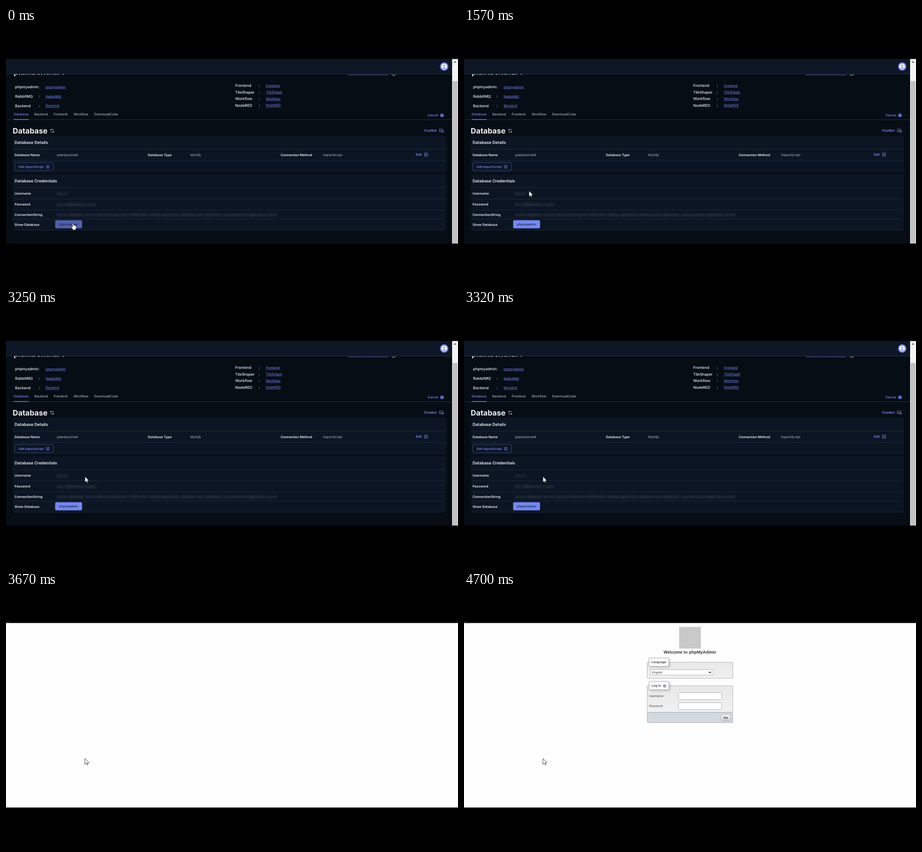
These frames come from a looping animation (998x561 px, 4.77 s). An HTML page:

```html
<!DOCTYPE html>
<html lang="en">
<head>
<meta charset="utf-8">
<title>Database console</title>
<style>
  html, body { margin: 0; width: 100%; height: 100%; overflow: hidden; background: #000; }
  svg { display: block; width: 998px; height: 561px; }
  text { font-family: Inter, sans-serif; text-rendering: geometricPrecision; white-space: pre; }
  #login text { font-family: "Liberation Sans", Arial, sans-serif; }
  .u { text-decoration: underline; }
</style>
</head>
<body>
<svg viewBox="0 0 998 561" xmlns="http://www.w3.org/2000/svg">
  <defs>
    <filter id="blur" x="-10%" y="-100%" width="120%" height="300%"><feGaussianBlur stdDeviation="2"/></filter>
    <filter id="shade" x="-30%" y="-50%" width="170%" height="220%">
      <feDropShadow dx="1.5" dy="1.5" stdDeviation="2.5" flood-color="#999" flood-opacity=".7"/>
    </filter>
    <linearGradient id="go" x2="0" y2="1"><stop stop-color="#fafafa"/><stop offset="1" stop-color="#ccc"/></linearGradient>
    <linearGradient id="field" x2="0" y2="1"><stop stop-color="#e8e8e8"/><stop offset="1" stop-color="#f1f1f1"/></linearGradient>
    <clipPath id="view"><rect y="101.5" width="985" height="374.5"/></clipPath>
    <g id="pencil" fill="none" stroke="#7487f0" stroke-linejoin="round">
      <path d="M4.3 1H.8V8H7.6V4.6"/><path d="M3 5.8L3.4 4.2L7.2.4L8.4 1.6L4.6 5.4Z"/>
    </g>
  </defs>

  <g id="dash"></g>
  <rect id="blank" y="68.5" width="998" height="407.5"/>
  <g id="login"></g>
  <path id="corner" fill="none" stroke="#444"/>

  <path id="arrow" fill="#fff" stroke="#111" stroke-width=".8" stroke-linejoin="round"
    d="M0 0V12.8L3 10.1L5 14.3L6.9 13.5L5 9.4H9Z"/>
  <path id="hand" fill="#fff" stroke="#111" stroke-width=".7" stroke-linejoin="round"
    d="M-1.2 1Q0-.7 1.2 1V5.2Q2.6 4.5 3.4 5.7Q4.8 5.2 5.4 6.3Q7 6 7.2 7.6V10.5L5.8 13V15H-.7V13.3L-4 9.2Q-4.4 7.4-2.7 7.8L-1.2 9Z"/>
</svg>

<script>
const $ = id => document.getElementById(id);
const BLUE = '#7487f0', LINE = '#1c293c', CARD = '#0c1523', WHITE = '#eef1f6', GREY = '#b4bbc6';

const text = (x, y, str, size = 7.28, fill = WHITE, weight = 400, more = '') =>
  `<text x="${x}" y="${y}" font-size="${size}" fill="${fill}" font-weight="${weight}" ${more}>${str}</text>`;
const rect = (x, y, w, h, fill, more = '') =>
  `<rect x="${x}" y="${y}" width="${w}" height="${h}" fill="${fill}" ${more}/>`;
const path = (d, stroke, width = 1, more = '') =>
  `<path d="${d}" fill="none" stroke="${stroke}" stroke-width="${width}" ${more}/>`;
const rule = (x1, x2, y, color = LINE) => path(`M${x1} ${y}H${x2}`, color);
const link = (x, y, str) => text(x, y, str, 7.28, BLUE, 400, 'class="u"');
const label = (x, y, str) => text(x, y, str, 7.28, WHITE, 600);
const secret = (x, y, str) => text(x, y, str, 7.28, '#8e98a8', 400, 'filter="url(#blur)" opacity=".6"');

function dashboard() {
  let s = rect(0, 68.5, 985, 407.5, '#070d15');

  // page title, scrolled under the top bar
  s += '<g clip-path="url(#view)">' + text(17, 102.8, 'plainboxtrial4', 16.63, WHITE, 700)
    + link(755, 102.4, 'Master Admin Credentials')
    + '<circle cx="856" cy="100" r="4.7" fill="none" stroke="#d8dde6"/></g>';
  s += rect(0, 68.5, 985, 32.5, '#0e1725') + rule(0, 985, 101.5, '#223046');
  s += `<circle cx="967.5" cy="85" r="9.2" fill="${BLUE}"/><circle cx="967.5" cy="85" r="6.2" fill="#fff"/>`
    + `<circle cx="967.5" cy="83" r="1.9" fill="${BLUE}"/><path d="M963.8 88.2Q967.5 84.6 971.2 88.2Q967.5 91.4 963.8 88.2Z" fill="${BLUE}"/>`;

  // links to the services
  [['phpmyadmin', 133], ['RabbitMQ', 153.9], ['Backend', 174.7]].forEach(([name, y], i) => {
    s += text(20, y, i ? name : name + ':', 8.32, WHITE, 500) + link(87.7, y - .3, name);
    if (i) s += text(72, y, ':', 8.32, WHITE, 500);
  });
  ['Frontend', 'TileShaper', 'Workflow', 'NodeRED'].forEach((name, i) => {
    const y = 130 + i * 14.55;
    s += text(506, y, name, 8.32, WHITE, 500) + text(558, y, ':', 8.32, WHITE, 500) + link(573.7, y - .3, name);
  });

  // tabs
  s += rule(3, 985, 202.5, '#223046');
  [[17, 'Database'], [62.7, 'Backend'], [105.2, 'Frontend'], [149.2, 'Workflow'], [194.4, 'DownloadCode']]
    .forEach(([x, name], i) => s += text(x, 192.7, name, 7.28, i ? '#c3cad5' : BLUE, i ? 400 : 500));
  s += path('M17 202.2H50', BLUE, 1.4);
  s += text(931, 194.5, 'Cancel', 6.9, BLUE, 600)
    + rect(958.7, 191, 8, 2.2, BLUE) + rect(959.2, 193.8, 7, 2.4, BLUE)
    + path('M960.7 191V189.2H964.7V191', BLUE);

  s += text(14.8, 233, 'Database', 16.63, WHITE, 700);
  s += path('M98.8 228.2A3.3 3.3 0 0 0 104.8 229M105.2 225.8A3.3 3.3 0 0 0 99.2 225M98.5 223.2V225.6H101M105.5 230.8V228.4H103', '#c6ccd6');
  s += text(922.7, 229.2, 'ChatBot', 7.28, BLUE, 600)
    + path('M957 223.3H963.2V227.6H958.8L957 229.2ZM964.7 225H965.6V231L963.8 229.3H959.2', BLUE);

  // details card
  s += rect(15, 238.3, 957, 81.5, CARD, 'rx="3"');
  s += text(19, 256.3, 'Database Details', 9.05, WHITE, 600) + rule(15, 972, 267.5) + rule(15, 972, 292.5);
  s += label(19, 282.7, 'Database Name') + text(112.7, 282.7, 'plainboxtrial4', 7.28, GREY)
    + label(313.3, 282.7, 'Database Type') + text(406.7, 282.7, 'MySQL', 7.28, GREY)
    + label(606.4, 282.7, 'Connection Method') + text(700, 282.7, 'ImportScript', 7.28, GREY)
    + text(904.7, 281.6, 'Edit', 7.28, BLUE, 600) + '<use href="#pencil" x="923.3" y="275"/>';
  s += rect(19.5, 297, 85, 18, 'none', 'rx="3" stroke="#3d4a78"')
    + text(28, 308.7, 'Edit ImportScript', 6.76, BLUE, 600)
    + '<use href="#pencil" transform="translate(88.5 302.5) scale(.88)"/>';

  // credentials card
  s += rect(15, 323.3, 957, 123.5, CARD, 'rx="3"');
  s += text(19, 341.4, 'Database Credentials', 9.05, WHITE, 600);
  [352.5, 377.5, 402, 422, 446.5].forEach((y, i) => s += rule(i ? 19 : 15, i ? 968 : 972, y));
  s += label(19, 367.8, 'Username') + label(19, 392.2, 'Password')
    + label(19, 414.7, 'ConnectionString') + label(19, 436.9, 'Show Database');
  s += secret(112.5, 367.6, 'box_trl') + secret(112.5, 392.2, 'box_trl@plainbox_4_pass')
    + secret(112.5, 414.7, 'server=database-service.internal.cluster;port=3306;initial-catalog=application_database;'
      + 'user=application_user;password=application_secret');
  s += rect(108.5, 424.5, 59.5, 18, BLUE, 'rx="3" id="open"') + text(117, 435.8, 'phpmyadmin', 6.76, '#161f3c', 500);

  // scrollbar
  s += rect(985, 68.5, 13, 407.5, '#f4f4f4') + rect(986, 117, 11, 359, '#c1c1c1')
    + '<path d="M988.5 76.5L991.5 73L994.5 76.5Z" fill="#555"/>';
  return s;
}

function loginPage() {
  const edge = 'stroke="#aaa" stroke-width=".9"';
  const legend = (y, w, str) => rect(408.5, y, w, 18, '#fff', edge + ' rx="1" filter="url(#shade)"')
    + text(414, y + 10.9, str, 6.9, '#444', 700);
  let s = rect(475, 77, 48, 48, '#c9c9c9');
  s += text(440.7, 136.2, 'Welcome to phpMyAdmin', 9.5, '#333', 700);

  s += rect(404.5, 155, 189, 35.5, 'url(#field)', edge + ' rx="1.5"') + legend(146, 43.5, 'Language');
  s += rect(412, 171.5, 138, 12, '#fff', edge) + text(415.7, 179.8, 'English', 6.9, '#333')
    + path('M540.3 176L543 178.8L545.7 176', '#222', 1.3);

  s += rect(404.5, 207, 189, 59, 'url(#field)', edge + ' rx="1.5"')
    + rect(404.5, 266, 189, 22.5, '#d1dae1', edge + ' rx="1.5"') + legend(197.8, 44, 'Log in');
  s += '<circle cx="443" cy="207.6" r="3.4" fill="#7d8aa8" stroke="#bcc3d0" stroke-width=".6"/>'
    + text(441.5, 209.6, '?', 5.4, '#fff', 700);
  [['Username:', 222.5], ['Password:', 244.5]].forEach(([name, y]) =>
    s += text(408.2, y + 9.8, name, 6.87, '#444') + rect(473.5, y, 95.5, 15, '#fff', edge + ' rx="1"'));
  s += rect(566.8, 270.5, 22.7, 14.6, 'url(#go)', edge + ' rx="7"') + text(573, 280.3, 'Go', 7, '#222', 700);
  return s;
}

$('dash').innerHTML = dashboard();
$('login').innerHTML = loginPage();

const LOOP = 4770, GREY_AT = 3460, WHITE_AT = 3670, FORM_AT = 3880;
// pointer stops: time, x, y
const STOPS = [
  [0, 148, 431], [140, 148, 431], [800, 113, 347], [1090, 113, 347],
  [1980, 173, 372], [2340, 173, 372], [2760, 174.3, 367.7], [LOOP, 174.3, 367.7]
];

function pointer(t) {
  const i = STOPS.findIndex(p => p[0] > t);
  const [a, b] = [STOPS[i - 1], STOPS[i]];
  const k = (t - a[0]) / (b[0] - a[0]), e = k * k * (3 - 2 * k);
  return [a[1] + (b[1] - a[1]) * e, a[2] + (b[2] - a[2]) * e];
}

const show = (id, on) => $(id).setAttribute('visibility', on ? 'visible' : 'hidden');
const start = performance.now();

function draw(now) {
  const raw = Math.max(0, now - start) % LOOP;
  const t = Math.floor(raw / 70) * 70;
  const [x, y] = pointer(t);
  const over = y > 424;

  show('dash', raw < GREY_AT);
  show('blank', raw >= GREY_AT);
  $('blank').setAttribute('fill', raw < WHITE_AT ? '#3c3c3a' : '#fefefe');
  show('login', raw >= FORM_AT);
  show('corner', raw >= WHITE_AT);
  $('corner').setAttribute('d', raw < FORM_AT ? 'M0 66.5H8' : 'M0 66.5H7.5V70');

  $('open').setAttribute('fill', over ? '#5160ac' : BLUE);
  show('hand', over);
  show('arrow', !over);
  for (const id of ['hand', 'arrow']) $(id).setAttribute('transform', `translate(${x} ${y})`);
  requestAnimationFrame(draw);
}
draw(start);
</script>
</body>
</html>
```
